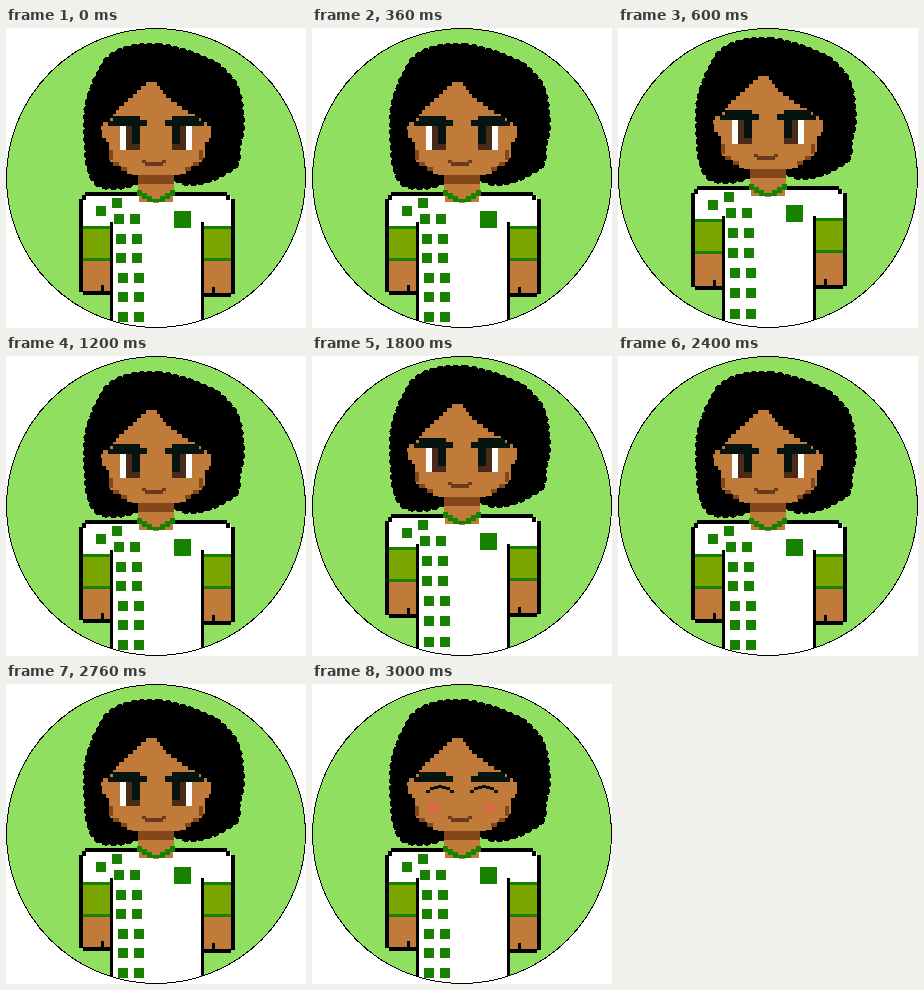
Recreate the animation shown at these times as an HTML page. Size 300 by 300 pixels, loop 3.2 s.

```html
<!DOCTYPE html>
<html lang="en">
<head>
<meta charset="utf-8">
<title>Player portrait</title>
<style>
html, body { margin: 0; width: 100%; height: 100%; overflow: hidden; background: #fff; }
svg { display: block; width: 300px; height: 300px; }
</style>
</head>
<body>
<svg viewBox="0 0 300 300" shape-rendering="crispEdges">
  <defs><clipPath id="disc"><circle cx="150" cy="150" r="149.5"/></clipPath></defs>
  <circle cx="150" cy="150" r="149.5" fill="#90df60"/>
  <g clip-path="url(#disc)">
    <g id="low"></g>
    <g id="high"></g>
    <g id="head">
      <!-- round dashes along the edge make the curls -->
      <path stroke="#000" stroke-width="10" stroke-linecap="round" stroke-dasharray="0 7.5"
        d="M151 20C130 18 108 24 100 36C96 46 90 52 88 62C84 70 82 78 82 92S82 132 86 143
           S92 156 102 157S124 156 132 151V130H168V146C174 154 186 154 190 153
           S204 151 212 146S232 138 230 128S235 110 234 94S233 62 222 50S206 36 196 32S165 20 151 20Z"/>
      <g id="face"></g>
      <g id="open"></g>
      <g id="shut"></g>
    </g>
  </g>
  <circle cx="150" cy="150" r="149.5" fill="none" stroke="#000"/>
</svg>
<script>
const NS = 'http://www.w3.org/2000/svg';
const $ = id => document.getElementById(id);
const SKIN = '#c07a3a', SHADE = '#84471a', INK = '#000', BROW = '#05140f',
      GREEN = '#168200', OLIVE = '#7aa400', WHITE = '#fff',
      LIP = '#6b3a1c', IRIS = '#4a2a18', BLUSH = '#ee5a4c';

// Rectangle given by its edges
function box(group, fill, l, t, r, b) {
  const el = document.createElementNS(NS, 'rect');
  const attrs = { x: l, y: t, width: r - l, height: b - t, fill };
  for (const k in attrs) el.setAttribute(k, attrs[k]);
  $(group).appendChild(el);
}
// The same rectangle on both sides of the centre line
function pair(group, fill, l, t, r, b) {
  box(group, fill, l, t, r, b);
  box(group, fill, 300 - r, t, 300 - l, b);
}
// Linear interpolation through [y, x] points
function along(pts, y) {
  let i = 1;
  while (i < pts.length - 1 && pts[i][0] < y) i++;
  const [y0, x0] = pts[i - 1], [y1, x1] = pts[i];
  return Math.round(x0 + (x1 - x0) * (y - y0) / (y1 - y0));
}

function arm(g, l, r, top, hem, foot, finger) {
  box(g, INK, l - 4, top + 7, r + 4, foot - 3);
  box(g, INK, l, foot - 4, r, foot);
  box(g, WHITE, l, top + 4, r, hem);
  box(g, GREEN, l, hem, r, hem + 35);
  box(g, OLIVE, l, hem + 3, r, hem + 32);
  box(g, SKIN, l, hem + 35, r, foot - 4);
  box(g, INK, finger, foot - 10, finger + 3, foot - 3);
}

// lift: 0 at rest, 1 with raised shoulders
function drawBody(g, lift) {
  const top = 164 - 6 * lift;
  box(g, SKIN, 132, top - 20, 168, top + 10);
  arm(g, 77, 104, top, 198 - 7 * lift, 267 - 5 * lift, 95);
  arm(g, 198, 225, top, 198 - 8 * lift, 269 - 8 * lift, 206);
  // shirt
  pair(g, INK, 79, top, 132, top + 4);
  pair(g, INK, 76, top + 3, 80, top + 8);
  pair(g, WHITE, 80, top + 4, 133, top + 20);
  box(g, INK, 104, top + 30, 198, 300);
  box(g, WHITE, 103, top + 10, 198, top + 30);
  box(g, WHITE, 107, top + 10, 195, 300);
  // collar
  for (let i = 0; i < 4; i++) {
    pair(g, SKIN, 135 + i * 4, top, 150, top + 2 + i * 3);
    pair(g, GREEN, 131 + i * 5, top - 2 + i * 3, 136 + i * 5, top + 4 + i * 3 - (i > 2 ? 3 : 0));
  }
  // checks
  const check = (x, y) => box(g, GREEN, x - 5, y - 5, x + 5, y + 5);
  check(111, top + 11);
  check(95, top + 19);
  for (let i = 0; i < 6; i++) {
    const x = 113 + 2 * Math.min(2, Math.ceil(i / 2));
    const y = Math.round(top + 27 + i * (19.6 + lift / 2));
    check(x, y);
    check(x + 16, y);
  }
  // badge
  box(g, GREEN, 168, top + 19, 185, top + 36);
}

function drawFace() {
  const g = 'face';
  const left = [[52, 142], [62, 131], [78, 113], [90, 104], [95, 95], [108, 96],
                [112, 103], [130, 104], [146, 126]];
  const right = [[52, 149], [66, 160], [80, 179], [92, 198], [97, 205], [108, 205],
                 [113, 199], [128, 199], [146, 174]];
  box(g, SHADE, 132, 146, 168, 156);
  for (let y = 54; y < 147; y += 4)
    box(g, SKIN, along(left, y), y, along(right, y), Math.min(y + 4, 147));
  // jaw shading
  pair(g, SHADE, 103, 122, 107, 132);
  pair(g, SHADE, 107, 134, 113, 138);
  pair(g, SHADE, 115, 139, 121, 143);
  // mouth
  box(g, LIP, 136, 132, 160, 135);
  box(g, SKIN, 140, 132, 156, 134);
  box(g, LIP, 139, 134, 157, 138);
  // brows
  pair(g, BROW, 107, 88, 134, 93);
  pair(g, BROW, 107, 92, 141, 98);
  pair(g, BROW, 102, 93, 108, 98);
}

function drawEyes() {
  pair('open', WHITE, 114, 98, 120, 122);
  pair('open', IRIS, 120, 98, 134, 122);
  pair('open', BROW, 126, 98, 134, 116);
  // closed lids
  for (let i = -3; i <= 3; i++) {
    const x = 128 + i * 4, y = 101 + Math.round(i * i * 0.6);
    pair('shut', BROW, x - 2, y, x + 2, y + 3);
  }
  // blush
  for (let i = 0; i < 3; i++) {
    pair('shut', BLUSH, 118 + i * 4, 118, 119 + i * 4, 129);
    pair('shut', BLUSH, 116, 120 + i * 3, 128, 121 + i * 3);
  }
}

const show = (id, on) => $(id).setAttribute('visibility', on ? 'visible' : 'hidden');

function render(ms) {
  const t = ms % 3200;
  const up = t < 3000 && Math.floor(t / 600) % 2 === 1;
  const closed = t >= 3000;
  $('head').setAttribute('transform', `translate(0 ${up ? -6 : 0})`);
  show('low', !up);
  show('high', up);
  show('open', !closed);
  show('shut', closed);
}

drawBody('low', 0);
drawBody('high', 1);
drawFace();
drawEyes();

function tick() {
  render(performance.now() - start);
  requestAnimationFrame(tick);
}
const start = performance.now();
tick();
</script>
</body>
</html>
```
